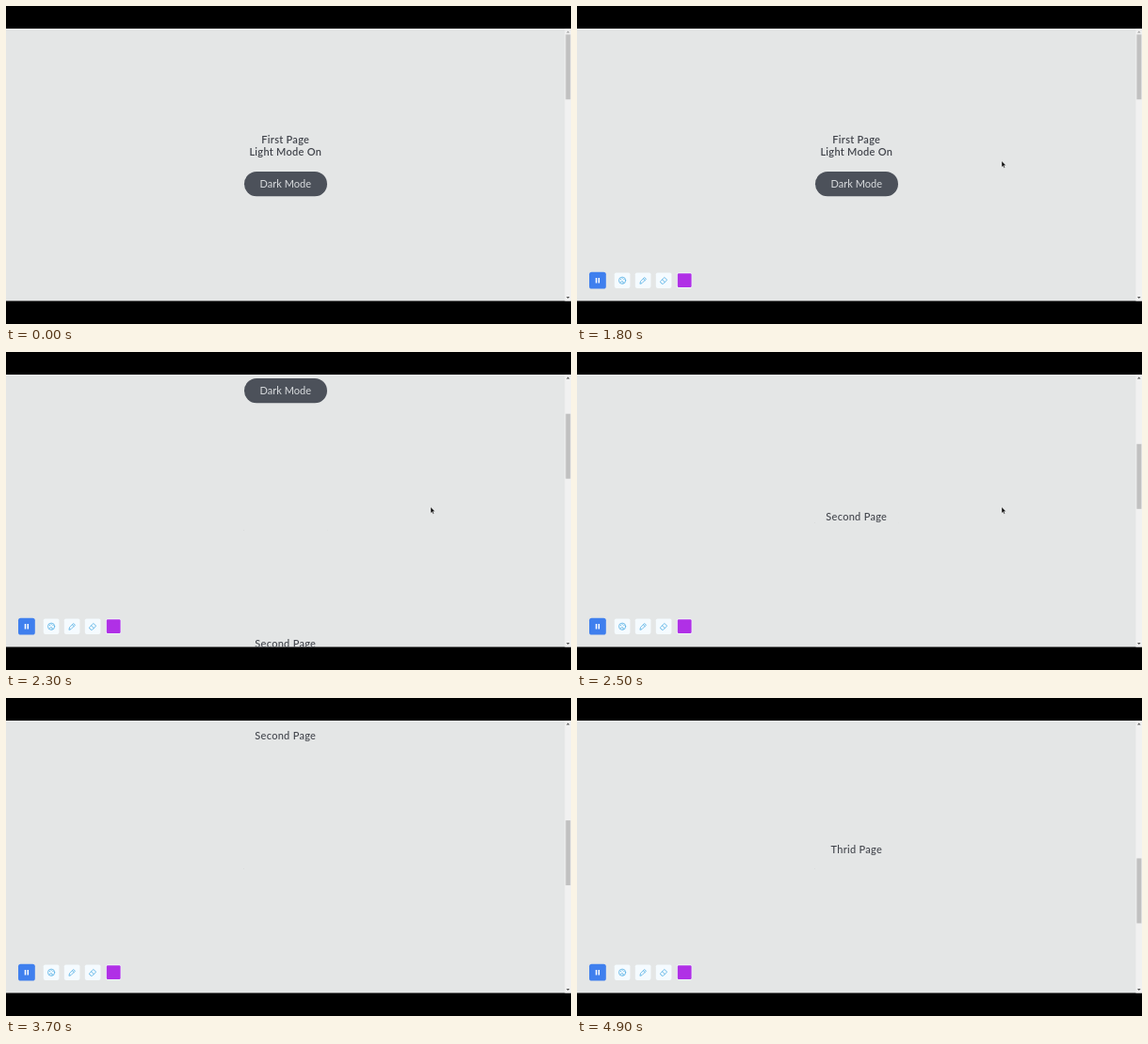
An HTML page for the animation above (5000 ms loop, 600 px wide and 338 px high).

```html
<!DOCTYPE html>
<html lang="en">
<head>
<meta charset="utf-8">
<title>Page scroll</title>
<style>
  html, body { margin: 0; width: 100%; height: 100%; overflow: hidden; background: #000; }
  svg { display: block; width: 100%; height: 100%; }
  text { font: 500 11px Lato, sans-serif; letter-spacing: .28px; text-anchor: middle; fill: #42454c; }
  .strong { font-weight: 600; }
  .label { font-weight: 400; letter-spacing: 0; fill: #d9dcdf; }
  .icon { fill: none; stroke: #58b1e6; stroke-width: .85; stroke-linecap: round; stroke-linejoin: round; }
</style>
</head>
<body>
<svg viewBox="0 0 600 338">
  <defs>
    <clipPath id="view"><rect y="24" width="600" height="289.5"/></clipPath>
  </defs>
  <rect width="600" height="338"/>
  <g clip-path="url(#view)">
    <rect y="24" width="600" height="290" fill="#e4e6e6"/>
    <g id="pages">
      <text class="strong" x="296.8" y="146">First Page</text>
      <text class="strong" x="296.8" y="159.2">Light Mode On</text>
      <rect x="253" y="176" width="88" height="26.3" rx="13.15" fill="#4c515a"/>
      <text class="label" x="296.8" y="193">Dark Mode</text>
      <text x="296.8" y="462.3">Second Page</text>
      <text x="296.8" y="752">Thrid Page</text>
    </g>

    <rect x="593.5" y="24" width="6.5" height="290" fill="#f1f1f1"/>
    <path id="up" d="M595 28.4l1.8-2 1.8 2z"/>
    <path d="M595 309l1.8 2 1.8-2z" fill="#505050"/>
    <rect id="thumb" x="594.4" y="30.3" width="5" height="69" fill="#c1c1c1"/>

    <g id="tools">
      <rect x="13" y="282.7" width="17.8" height="17.8" rx="2.6" fill="#3f7fee"/>
      <path d="M20.5 289v5.4M23.3 289v5.4" stroke="#fff" stroke-width="1.5"/>
      <g fill="#f5fbff">
        <rect x="39.8" y="283.5" width="16.6" height="16.4" rx="1.8"/>
        <rect x="61.8" y="283.5" width="16.6" height="16.4" rx="1.8"/>
        <rect x="83.8" y="283.5" width="16.6" height="16.4" rx="1.8"/>
        <rect x="106.2" y="283.5" width="16" height="16.2" rx="1.8"/>
      </g>
      <rect x="106.8" y="284.2" width="14.8" height="14.8" rx="1.2" fill="#b030e6"/>
      <g class="icon">
        <circle cx="48.1" cy="291.7" r="3.6"/>
        <path d="M46.3 290.6h.3M48 289.7h.3M49.8 290.6h.3M46.5 293.2q1.6-1.6 2.6 0v1.6"/>
        <path d="M67 294.9l.5-2.2 4.2-4.2 1.7 1.7-4.2 4.2zM70.4 289.8l1.7 1.7"/>
        <path d="M88.6 292.7l4.2-4.2 2.9 2.6-4.2 4.1h-1.2zM90.5 290.9l2.8 2.6"/>
      </g>
    </g>

    <path id="cursor" d="M0 0v6.4l1.5-1.3 1 2.3 1-.4-1-2.3h2z" fill="#111" stroke="#fff" stroke-width=".35"/>
  </g>
</svg>
<script>
  const LOOP = 5000, STEP = 100, PAGE = 289.5, GLIDE = 637;
  const STARTS = [1979, 3394, 4779];
  const $ = id => document.getElementById(id);
  const [pages, up, thumb, tools, cursor] = ["pages", "up", "thumb", "tools", "cursor"].map($);

  const clamp = v => Math.max(0, Math.min(1, v));
  const ease = p => p < .5 ? 4 * p ** 3 : 1 - 4 * (1 - p) ** 3;
  const move = (el, x, y) => el.setAttribute("transform", `translate(${x.toFixed(2)} ${y.toFixed(2)})`);
  const scrollAt = t => STARTS.reduce((sum, s) => sum + PAGE * ease(clamp((t - s) / GLIDE)), 0);

  function draw(t) {
    const y = scrollAt(t);
    move(pages, 0, -Math.round(y));
    move(thumb, 0, y * .2388);
    up.setAttribute("fill", t < 2000 ? "#a3a3a3" : "#505050");

    tools.setAttribute("opacity", clamp(t / 200));

    const p = clamp((t - 400) / 400), rest = (1 - p) ** 2;
    move(cursor, 451 + 35 * rest, 164.8 - 4 * rest);
    cursor.setAttribute("visibility", t >= 400 && t < 3200 ? "visible" : "hidden");
  }

  // The picture holds for a tenth of a second at a time.
  const origin = performance.now();
  function tick() {
    const t = (performance.now() - origin) % LOOP;
    draw(Math.floor(t / STEP) * STEP);
    requestAnimationFrame(tick);
  }
  tick();
</script>
</body>
</html>
```
